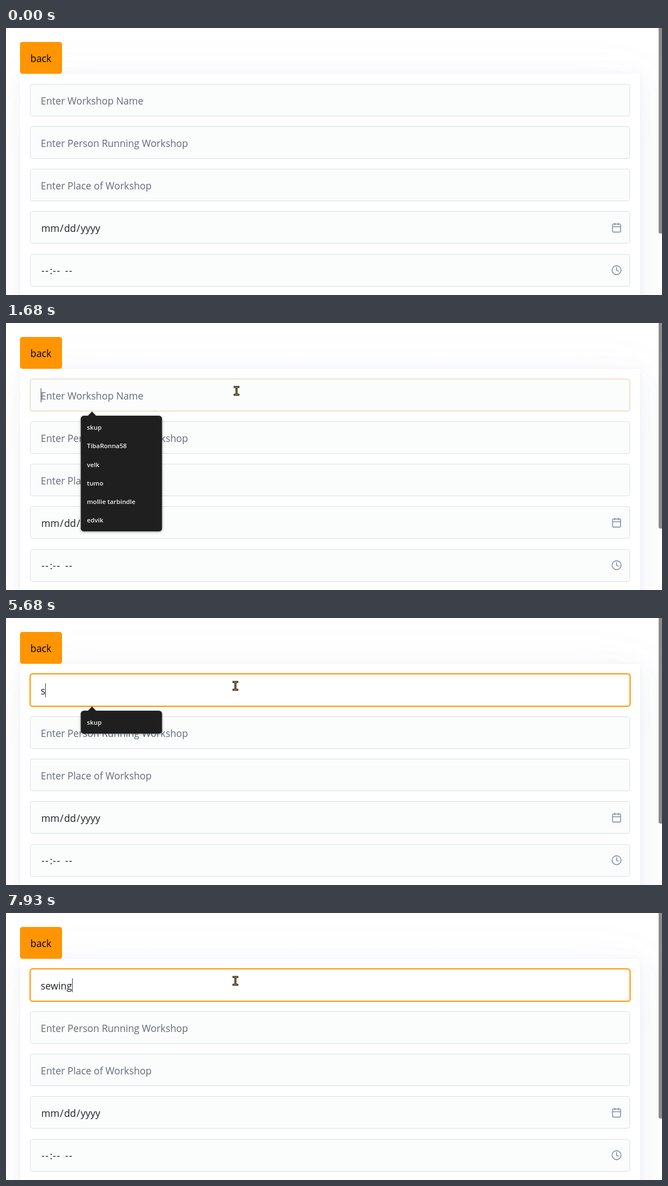
Write an HTML page that moves like this. It is 1171 by 478 pixels and loops after 8000 ms.

```html
<!DOCTYPE html>
<html lang="en">
<head>
<meta charset="utf-8">
<title>Workshop form</title>
<style>
  html { font-size: 18.3px; }
  html, body { margin: 0; width: 100%; height: 100%; overflow: hidden; background: #fff; }
  #stage { position: relative; width: 1171px; height: 478px; overflow: hidden; }
  #stage > * { position: absolute; box-sizing: border-box; }
  .card {
    --c: 129, 145, 181;
    left: 24.5px; top: 82px; width: 1107.5px; height: 1000px; border-radius: 4.5px; background: #fff;
    box-shadow:
      .0145rem .029rem .174rem rgba(var(--c), .017),
      .0335rem .067rem .402rem rgba(var(--c), .024),
      .0625rem .125rem .75rem rgba(var(--c), .03),
      .1125rem .225rem 1.35rem rgba(var(--c), .036),
      .2085rem .417rem 2.502rem rgba(var(--c), .043),
      .5rem 1rem 6rem rgba(var(--c), .06),
      0 0 0 .0625rem rgba(var(--c), .015);
  }
  .back { left: 24.5px; top: 25px; width: 75.5px; height: 57px; border-radius: 4.5px; background: #ff9500; }
  .field { left: 43px; width: 1071px; height: 58px; border: 1px solid #d9dfe3; border-radius: 4.5px; background: #fbfdfc; }
  #focus { left: 42px; top: 99px; width: 1073px; height: 60px; border: 2px solid #ff9500; border-radius: 5.5px; background: #fff; }
  .thumb { left: 1165px; top: -10px; width: 8px; height: 378px; border-radius: 3px; background: #8b8b8b; }
  svg { left: 0; top: 0; width: 1171px; height: 478px; }
  text { font: 17.35px "Open Sans", "Noto Sans", sans-serif; fill: #646b79; white-space: pre; }
  .value text, text.value { fill: #1d2127; }
  .dash { letter-spacing: 1.5px; }
  .icon { fill: none; stroke: #8891a4; stroke-width: 2; stroke-linecap: round; stroke-linejoin: round; }
  #menu { filter: drop-shadow(0 1px 2px rgba(0, 0, 0, .4)); }
  #menu text { font-size: 11.3px; font-weight: 600; fill: #f1f1f1; }
</style>
</head>
<body>
<div id="stage">
  <div class="card"></div>
  <div class="back"></div>
  <div id="focus"></div>
  <div class="thumb"></div>
  <svg>
    <text x="43.5" y="61" style="fill:#000">back</text>
    <text id="hint" x="62" y="136.5">Enter Workshop Name</text>
    <text x="62" y="212.7">Enter Person Running Workshop</text>
    <text x="62" y="288.7">Enter Place of Workshop</text>
    <g class="value">
      <text y="364.8"><tspan x="63">mm</tspan><tspan dx="1">/</tspan><tspan dx="1">dd</tspan><tspan dx="1">/</tspan><tspan dx="1">yyyy</tspan></text>
      <text y="440.8"><tspan class="dash" x="63.2">--</tspan><tspan x="78.3">:</tspan><tspan class="dash" x="83.6">--</tspan><tspan class="dash" x="105.4">--</tspan></text>
    </g>
    <g class="icon" transform="translate(1080.3 347.8) scale(.8)">
      <rect x="3" y="4" width="18" height="18" rx="2"/>
      <path d="M16 2v4M8 2v4M3 10h18"/>
    </g>
    <g class="icon" transform="translate(1080.3 424) scale(.8)">
      <circle cx="12" cy="12" r="10"/>
      <path d="M12 6v6l4 2"/>
    </g>
    <text id="typed" class="value" x="62" y="136.5"></text>
    <rect id="caret" y="117" width="1" height="25" fill="#3c3f45"/>
    <g id="menu">
      <path d="M145.5 167l8-8.5 8 8.5z" fill="#1f1f1f"/>
      <rect id="panel" x="133.5" y="166" width="145" rx="5.5" fill="#1f1f1f"/>
    </g>
    <g id="cursor">
      <g id="beam" fill="none" stroke-linecap="square">
        <path d="M-3.3-7H3.3M0-7V7M-3.3 7H3.3" stroke="#171310" stroke-width="3.5"/>
        <path d="M-3.3-7H3.3M0-7V7M-3.3 7H3.3" stroke="#b4873f" stroke-width="1.3"/>
      </g>
      <path id="arrow" d="M0 0V16.5L3.8 13 6.3 18.8 9 17.6 6.5 12H11.7Z" fill="#f29a1c" stroke="#171310" stroke-linejoin="round"/>
    </g>
  </svg>
</div>
<script>
const LOOP = 8000, FIELD_TOP = 100, PITCH = 76.15;
const $ = id => document.getElementById(id);
const show = (el, on) => { el.style.display = on ? '' : 'none'; };

const names = ['skup', 'TibaRonna58', 'velk', 'tumo', 'mollie tarbindle', 'edvik'];
const typing = [[0, ''], [5680, 's'], [5940, 'se'], [6340, 'sew'], [6740, 'sewn'],
  [7270, 'sew'], [7600, 'sewi'], [7800, 'sewin'], [7930, 'sewing']];
const caretFlips = [1680, 2150, 2700, 3210, 3750, 4290, 4820, 5340, 5680];
const focusSteps = [[0, 0], [1680, .13], [1760, .65], [1840, 1]];
const menuSteps = [[0, 0], [1680, 1], [5940, .85], [6010, .6], [6070, .35], [6140, .12], [6210, 0]];
// time, x, y
const path = [[70, 1166, 468], [300, 1132, 400], [560, 1070, 305], [860, 1018.5, 230],
  [930, 925, 196], [1000, 800, 160], [1130, 590, 116], [1200, 515, 109], [1270, 462.5, 108],
  [1400, 436, 113], [1540, 418, 119], [1670, 411.5, 121.5], [1740, 409.5, 121.5]];

const stepAt = (steps, t) => steps.findLast(s => s[0] <= t)[1];

function pointAt(t) {
  const tick = 200 / 3;
  const at = 70 + Math.floor((t - 70) / tick + .001) * tick;
  const i = path.findIndex(p => p[0] > at);
  if (i < 0) return path.at(-1).slice(1);
  const a = path[Math.max(i - 1, 0)], b = path[i];
  const k = Math.max(0, (at - a[0]) / (b[0] - a[0] || 1));
  return [a[1] + (b[1] - a[1]) * k, a[2] + (b[2] - a[2]) * k];
}

function overTextField(x, y) {
  const row = (y - FIELD_TOP) / PITCH;
  return x > 43 && x < 1114 && row >= 0 && row < 3 && row % 1 < 58 / PITCH;
}

for (let i = 0; i < 5; i++) {
  const field = document.createElement('div');
  field.className = 'field';
  field.style.top = Math.round(FIELD_TOP + i * PITCH) + 'px';
  $('stage').insertBefore(field, $('focus'));
}

const items = names.map((name, i) => {
  const item = document.createElementNS('http://www.w3.org/2000/svg', 'text');
  item.setAttribute('x', 144.5);
  item.setAttribute('y', 191.2 + i * 33.2);
  item.textContent = name;
  return $('menu').appendChild(item);
});

function draw(t) {
  const word = stepAt(typing, t);
  $('typed').textContent = word;
  show($('hint'), !word);
  $('focus').style.opacity = stepAt(focusSteps, t);

  const width = word ? $('typed').getComputedTextLength() : 0;
  $('caret').setAttribute('x', 62 + Math.round(width));
  show($('caret'), caretFlips.filter(f => f <= t).length % 2);

  const count = word ? 1 : names.length;
  $('menu').style.opacity = stepAt(menuSteps, t);
  $('panel').setAttribute('height', 7.8 + count * 33.2);
  items.forEach((item, i) => show(item, i < count));

  const [x, y] = pointAt(t);
  const beam = overTextField(x, y);
  show($('cursor'), t >= 70);
  show($('beam'), beam);
  show($('arrow'), !beam);
  $('cursor').setAttribute('transform', `translate(${x} ${y})`);
}

const start = performance.now();
function tick() {
  draw((performance.now() - start) % LOOP);
  requestAnimationFrame(tick);
}
tick();
</script>
</body>
</html>
```
